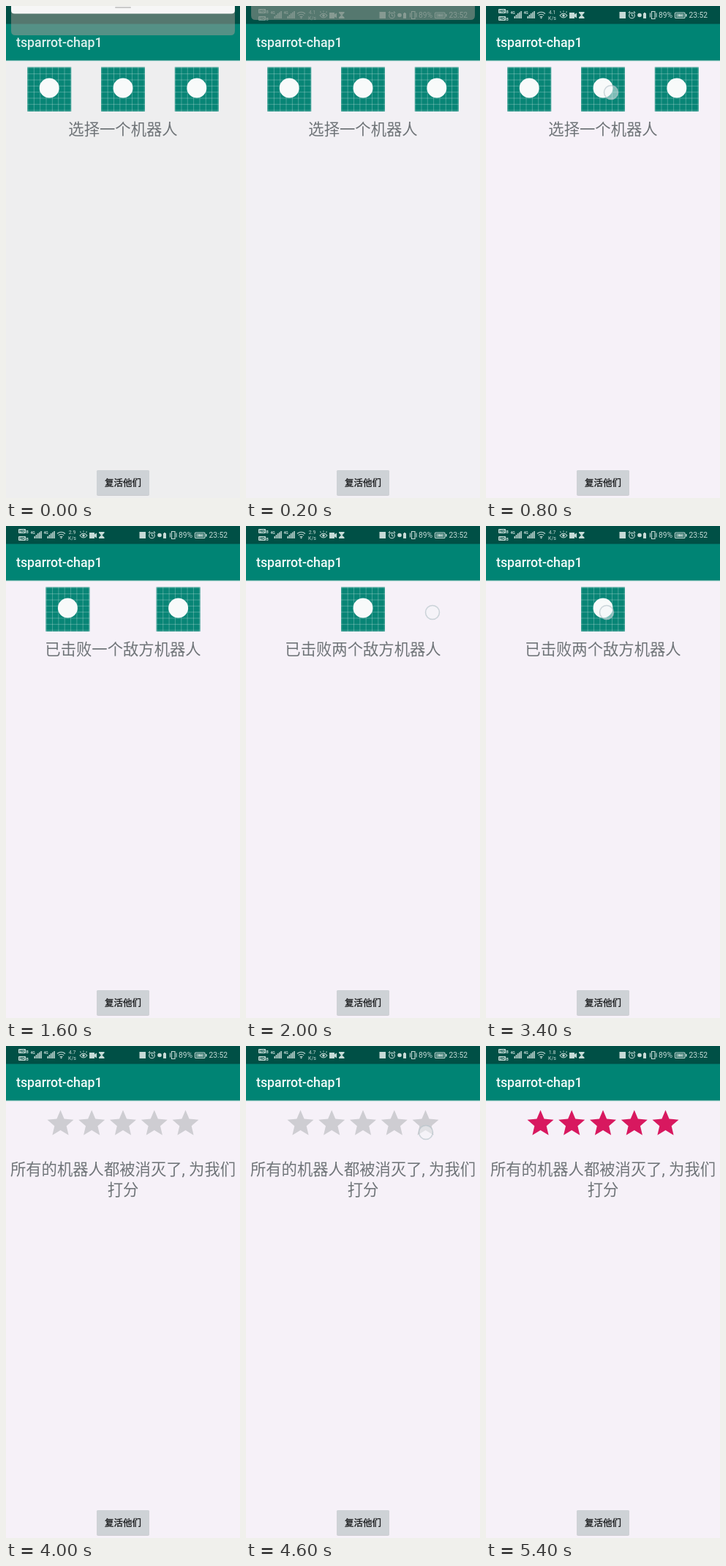
These frames come from a looping animation (320x672 px, 5.6 s). An HTML page:

```html
<!DOCTYPE html>
<html lang="zh-CN">
<head>
<meta charset="utf-8">
<style>
html, body { margin: 0; height: 100%; overflow: hidden; background: #f6f1f8; }
svg { display: block; width: 100vw; height: 100vh; }
text { font-family: Roboto, "Noto Sans CJK SC", "Noto Sans CJK", sans-serif; }
#msg, #msg2 { font-size: 21.33px; fill: #6f7478; text-anchor: middle; }
#status { fill: #c6dad6; stroke: none; }
#status .line { fill: none; stroke: #c6dad6; stroke-width: 1.1; }
</style>
</head>
<body>
<svg viewBox="0 0 320 672" preserveAspectRatio="none">
  <defs>
    <g id="tile">
      <rect x="-30" width="60" height="60.5" fill="#088576"/>
      <path id="grid" fill="none" stroke="#fff" stroke-opacity=".32" stroke-width=".8"/>
      <circle cy="28.5" r="13.5" fill="#f8fafa"/>
    </g>
    <path id="star" d="M12 17.27L18.18 21l-1.64-7.03L22 9.24l-7.19-.61L12 2 9.19 8.63 2 9.24l5.46 4.73L5.82 21z"/>
    <g id="signal">
      <text y="11" font-size="5" font-weight="700">4G</text>
      <path d="M5 14h1.5v3H5zM7.2 12h1.5v5H7.2zM9.4 10h1.5v7H9.4zM11.6 8.5h1.5V17h-1.5zM13.8 7h1.5v10h-1.5z"/>
    </g>
    <g id="hd">
      <rect width="10" height="6" rx="1"/>
      <text x="5" y="5" font-size="5.6" font-weight="700" text-anchor="middle" style="fill:#005046">HD</text>
      <text x="10.6" y="5.6" font-size="5.2" font-weight="700">B</text>
    </g>
  </defs>

  <rect id="page" width="320" height="672"/>
  <rect y="74" width="320" height="2" fill="#dfe9ea"/>
  <rect y="24" width="320" height="50.5" fill="#008474"/>
  <rect width="320" height="24.5" fill="#005046"/>
  <text id="title" x="14" y="56" font-size="17.78" font-weight="500" fill="#f4fbfa">tsparrot-chap1</text>

  <g id="status">
    <use href="#hd" x="17" y="4"/>
    <use href="#hd" x="17" y="14"/>
    <use href="#signal" x="33.5"/>
    <use href="#signal" x="51.5"/>
    <path class="line" d="M70 10.5q5.5-4.5 11 0M71.8 12.8q3.7-3 7.4 0M73.6 15q1.9-1.5 3.8 0"/>
    <circle cx="75.5" cy="16.3" r="1"/>
    <g font-size="7" text-anchor="middle">
      <text id="speed" x="90.5" y="11"></text>
      <text x="90.5" y="19">K/s</text>
    </g>
    <path class="line" d="M101 13q5-6 10 0-5 6-10 0zM102.5 9l-1-1.5M106 8V6.5M109.5 9l1-1.5"/>
    <circle cx="106" cy="13" r="1.8"/>
    <path d="M114 9h7v2.5l3-2v7l-3-2V17h-7z"/>
    <path d="M127 8h7.5v1.5l-3 3 3 3V17H127v-1.5l3-3-3-3z"/>
    <rect x="182.5" y="8" width="8.5" height="9"/>
    <g class="line">
      <circle cx="199.5" cy="13" r="3.8"/>
      <path d="M199.5 10.5V13l1.8 1M195 9.5l2-2M204 9.500l-2-2"/>
      <path d="M226.5 7.5h4.5v10h-4.5zM224.5 9.5v6M233 9.5v6"/>
      <rect x="258.5" y="9" width="13.5" height="7.5" rx="1"/>
    </g>
    <circle cx="210" cy="12.5" r="2.8"/>
    <path d="M215 10h1V9h2v1h1v7h-4z"/>
    <rect x="260" y="10.3" width="10.5" height="5" opacity=".6"/>
    <path d="M273 11h1.5v3.5H273zM262.5 12.8l2.5-1.8v1.2h3.5v1.2H265v1.2z"/>
    <text x="236" y="16.3" font-size="10.3">89%</text>
    <text x="277.5" y="16.3" font-size="10.3">23:52</text>
  </g>

  <g id="tiles"></g>
  <g id="stars"></g>
  <text id="msg" x="160" y="176"></text>
  <text id="msg2" x="160" y="204"></text>

  <rect x="124" y="635" width="72" height="34" rx="2" fill="#aeb0b5" opacity=".55"/>
  <rect x="124" y="634" width="72" height="34" rx="1.5" fill="#ced2d6"/>
  <text x="160" y="655.5" font-size="12.44" font-weight="500" fill="#1b1c1e" stroke="#1b1c1e" stroke-width=".35" text-anchor="middle">复活他们</text>

  <circle id="touch" r="9.500" cy="118" fill="#f3f5f8" fill-opacity=".5" stroke="#b4c2c8" stroke-opacity=".65" stroke-width="1.500"/>

  <g id="shade">
    <path d="M7 0H313V34q0 6-6 6H13q-6 0-6-6z" fill="#a9a098" opacity=".5"/>
    <path d="M7-30H313V6q0 4.5-5 4.5H12q-5 0-5-4.5z" fill="#f6f6f6"/>
    <rect x="149" y="1" width="22" height="2" rx="1" fill="#c9c9c9"/>
  </g>
</svg>
<script>
const LOOP = 5600, STEP = 200;
const $ = id => document.getElementById(id);
const set = (id, name, value) => $(id).setAttribute(name, value);

// Scenes: start time, tile centres, message lines
const scenes = [
  [0, [59.2, 160, 260.8], '选择一个机器人'],
  [1000, [84.4, 235.6], '已击败一个敌方机器人'],
  [2000, [160], '已击败两个敌方机器人'],
  [3600, [], '所有的机器人都被消灭了, 为我们', '打分']
];
const speeds = [[0, '4.1'], [1400, '2.9'], [3400, '4.7'], [5000, '1.8']];
// Touches: start, end, x
const touches = [[800, 1200, 171], [1800, 2200, 255], [3400, 3800, 165], [4600, 5000, 246]];
const RATED = 4800;

const current = (list, t) => list.filter(item => item[0] <= t).pop();

let lines = '';
for (let i = 0; i < 8; i++) {
  const p = 0.83 + i * 8.33;
  lines += `M${p - 30} 0v60.5M-30 ${p}h60`;
}
set('grid', 'd', lines);

$('stars').innerHTML = [74.5, 117.2, 160, 202.8, 245.5].map(x =>
  `<use href="#star" transform="translate(${x - 21.6} 84) scale(1.8)"/>`).join('');

let shown = -1;
function draw(now) {
  const t = Math.floor(now % LOOP / STEP) * STEP;
  if (t !== shown) {
    shown = t;
    const [, tiles, line1, line2 = ''] = current(scenes, t);
    $('tiles').innerHTML = tiles.map(x => `<use href="#tile" x="${x}" y="83.5"/>`).join('');
    $('msg').textContent = line1;
    $('msg2').textContent = line2;
    $('speed').textContent = current(speeds, t)[1];

    set('stars', 'visibility', tiles.length ? 'hidden' : 'visible');
    set('stars', 'fill', t < RATED ? '#cecdd2' : '#d8185f');

    const touch = touches.find(([a, b]) => t >= a && t < b);
    set('touch', 'visibility', touch ? 'visible' : 'hidden');
    if (touch) set('touch', 'cx', touch[2]);

    // The notification shade slides away while the page brightens
    const k = Math.min(1, t / 400);
    set('shade', 'transform', `translate(0 ${-42 * k})`);
    set('status', 'opacity', k);
    set('title', 'opacity', 0.9 + 0.1 * k);
    set('page', 'fill', `rgb(${238 + 8 * k} ${238 + 3 * k} ${239 + 9 * k})`);
  }
  requestAnimationFrame(() => draw(performance.now() - start));
}
const start = performance.now();
draw(0);
</script>
</body>
</html>
```
